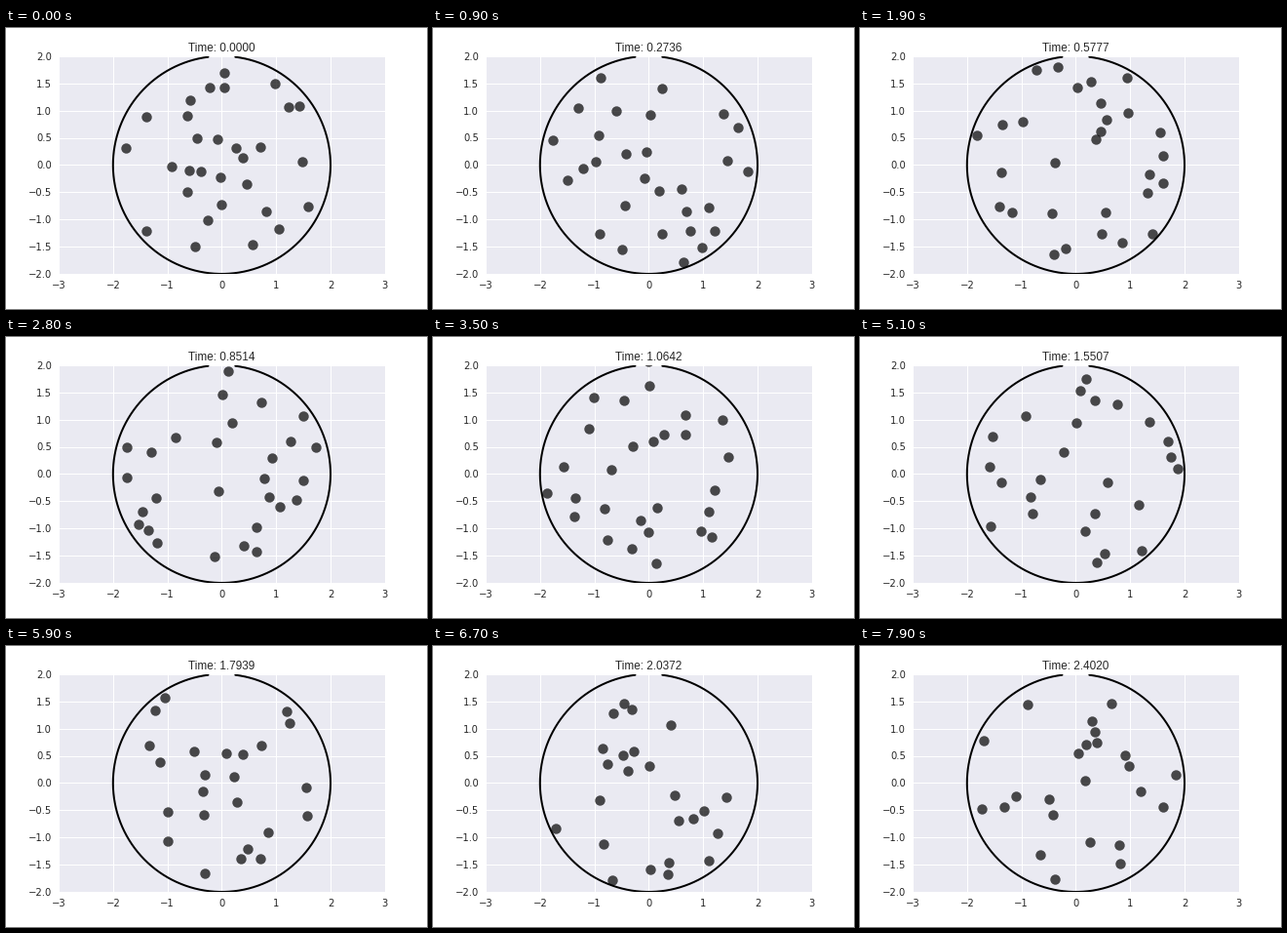
A matplotlib script that plays this animation: 432x288 px, repeating every 8 s.

```python
import numpy as np
import matplotlib.pyplot as plt
from matplotlib.animation import FuncAnimation

FRAMES, DT, SUBSTEPS = 80, 0.0304055, 6
RADIUS, BALL, GAP = 2.0, 0.1, 0.25
SIGMA = 5.0            # spread of each velocity component
LOST = 7               # balls gone by the end of the loop
RUNS = 40

plt.rcParams.update({
    'font.family': 'DejaVu Sans', 'text.color': '.15',
    'xtick.labelcolor': '.15', 'ytick.labelcolor': '.15',
    'axes.facecolor': '#eaeaf2', 'axes.axisbelow': True,
})

# Where the gas starts
START = np.array([
    (0.05, 1.70), (-0.22, 1.42), (0.05, 1.42), (0.98, 1.50), (1.23, 1.06),
    (1.43, 1.08), (-0.58, 1.19), (-0.63, 0.90), (-1.39, 0.88), (-1.77, 0.31),
    (-0.45, 0.49), (-0.07, 0.47), (0.27, 0.31), (0.71, 0.33), (0.38, 0.13),
    (1.48, 0.06), (-0.92, -0.03), (-0.60, -0.10), (-0.38, -0.12),
    (-0.02, -0.23), (0.46, -0.35), (-0.63, -0.50), (0.00, -0.73),
    (0.82, -0.86), (1.59, -0.77), (-0.25, -1.02), (1.05, -1.18),
    (-1.39, -1.22), (-0.49, -1.49), (0.57, -1.46)])


def collide(pos, vel, inside):
    """Equal elastic discs swap their speeds along the line of contact."""
    diff = pos[:, None] - pos[None]
    near = (diff ** 2).sum(-1) < (2 * BALL) ** 2
    near &= inside[:, None] & inside[None]
    for i, j in np.argwhere(np.triu(near, 1)):
        n = diff[i, j] / np.linalg.norm(diff[i, j])
        closing = (vel[i] - vel[j]) @ n
        if closing < 0:
            vel[i] -= closing * n
            vel[j] += closing * n


def bounce(pos, vel, inside):
    """Mirror balls off the round wall, except at the opening on top."""
    r = np.linalg.norm(pos, axis=1)
    n = pos / np.maximum(r, 1e-9)[:, None]
    outward = (vel * n).sum(1)
    opening = (np.abs(pos[:, 0]) < GAP) & (pos[:, 1] > 0)
    hit = inside & ~opening & (r > RADIUS - BALL) & (outward > 0)
    vel[hit] -= 2 * outward[hit, None] * n[hit]
    pos[hit] = n[hit] * (RADIUS - BALL)


def simulate(seed):
    rng = np.random.default_rng(seed)
    pos, vel = START.copy(), rng.normal(0, SIGMA, START.shape)
    inside = np.ones(len(pos), bool)
    track = [pos.copy()]
    for _ in range(FRAMES - 1):
        for _ in range(SUBSTEPS):
            pos += vel * DT / SUBSTEPS
            inside &= np.hypot(*pos.T) < RADIUS
            collide(pos, vel, inside)
            bounce(pos, vel, inside)
        track.append(pos.copy())
    return np.array(track)


def leak_error(track):
    """Distance from a steady leak through the opening."""
    count = (np.hypot(track[..., 0], track[..., 1]) < RADIUS).sum(1)
    steady = len(START) - LOST * np.linspace(0, 1, FRAMES)
    return np.abs(count - steady).sum()


track = min(map(simulate, range(RUNS)), key=leak_error)

fig = plt.figure(figsize=(6, 4), dpi=72, facecolor='white')
ax = fig.add_axes([0.125, 0.125, 0.775, 0.775])
ax.set(xlim=(-3, 3), ylim=(-2, 2),
       xticks=np.arange(-3, 4), yticks=np.arange(-2, 2.1, 0.5))
ax.tick_params(length=0, pad=7, labelsize=10)
ax.grid(color='white', lw=1, ls='-')
for spine in ax.spines.values():
    spine.set_visible(False)

half = GAP / RADIUS
angle = np.linspace(np.pi / 2 + half, 5 * np.pi / 2 - half, 400)
ax.plot(RADIUS * np.cos(angle), RADIUS * np.sin(angle), color='black', lw=2,
        solid_capstyle='round')
balls, = ax.plot([], [], 'o', color='black', ms=10, mew=0.3, alpha=0.7)
title = ax.set_title('', family='Liberation Sans', fontsize=11.7, pad=5)


def draw(frame):
    balls.set_data(*track[frame].T)
    title.set_text(f'Time: {frame * DT:.4f}')
    return balls, title


anim = FuncAnimation(fig, draw, frames=FRAMES, interval=100, repeat=True,
                     repeat_delay=0, blit=False)
plt.show()
```
